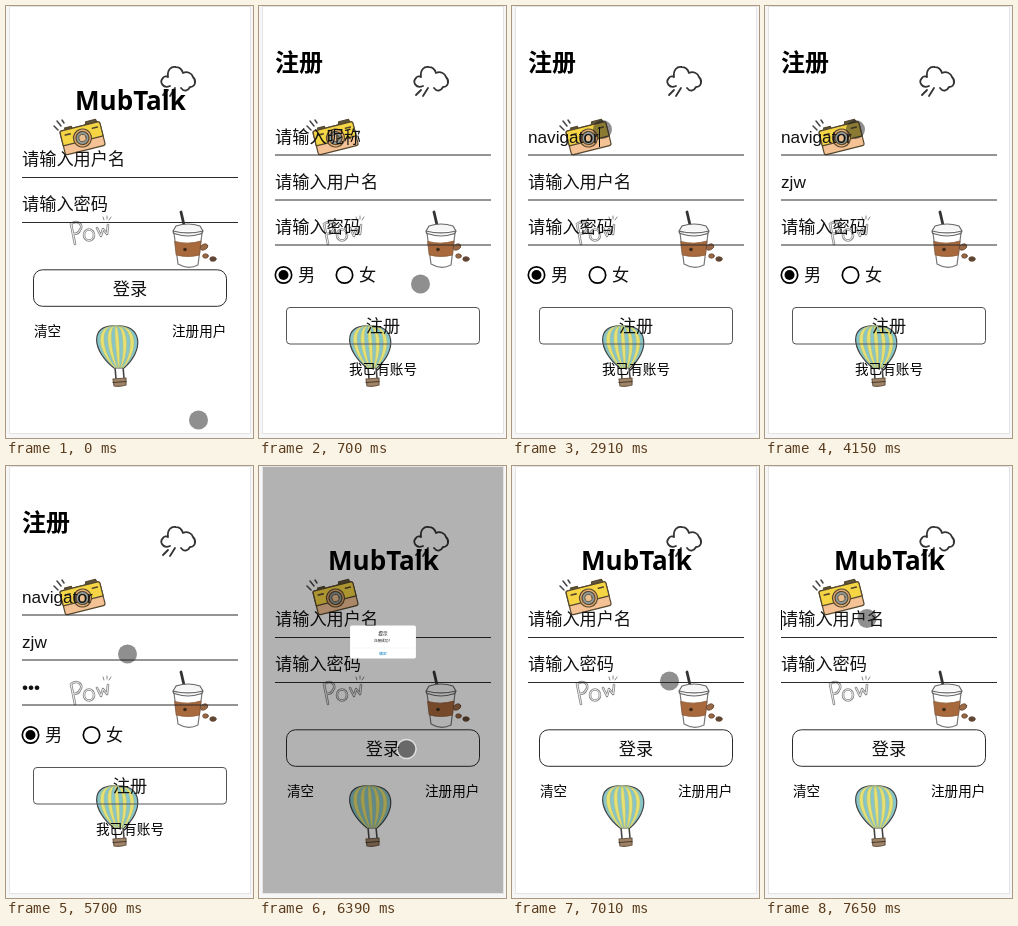
Write an HTML page that moves like this. It is 247 px wide and 432 px high and loops after 8 s.

```html
<!DOCTYPE html>
<html lang="zh-CN">
<head>
<meta charset="utf-8">
<style>
html, body { margin: 0; width: 100%; height: 100%; overflow: hidden; background: #f6f6f6; }
svg { display: block; width: 247px; height: 432px; }
text { font: 17.2px "Liberation Sans", "Noto Sans CJK SC", "Noto Sans CJK", sans-serif; fill: #111; }
.mid { text-anchor: middle; }
.small { font-size: 13.6px; fill: #000; }
.logo { font: bold 26px "Open Sans", "Noto Sans", sans-serif; fill: #000; }
.title { font-size: 24px; font-weight: bold; fill: #000; }
.tip { font-size: 10.9px; }
.ok { font-size: 11px; font-weight: 500; fill: #0a7fc4; }
.rule { stroke: #2b2b2b; fill: none; }
.ink { stroke: #444; stroke-width: 1.2; stroke-linecap: round; stroke-linejoin: round; fill: none; }
</style>
</head>
<body>
<svg viewBox="0 0 247 432">
  <rect x="3.5" y=".5" width="241" height="427" fill="#fff" stroke="#e4e4e4"/>

  <g class="ink">
    <g stroke="#333" stroke-width="1.8">
      <path d="M164 80C157 83 153 76 157 72C158 70 161 70 162 71C161 64 165 60 170 61C174 61 176 64 177 67C181 65 186 67 187 71C191 75 189 81 184 81C182 85 178 86 175 82"/>
      <path d="M162 84L157 89M169 82L164 90"/>
    </g>
    <g>
      <path d="M48 120L52 124M51 115L55 120M56 114L58 117" stroke-width="1.5"/>
      <g transform="translate(76.5 132) rotate(-14)" stroke="#55482f">
        <path d="M-15-12v-2h7v2M6-12l1-3h10l1 3" fill="#5d543a"/>
        <rect x="-20.5" y="-12" width="41" height="24.500" rx="2" fill="#f4c294"/>
        <path d="M-20.5 3V-10q0-2 2-2h37q2 0 2 2V3Z" fill="#f6d545"/>
        <path d="M12-7h5M-16-7h5" stroke-width="1.600"/>
        <circle r="9" fill="#e8ad74"/>
        <circle r="6.500" fill="#8f9a9c"/>
        <circle r="3.600" fill="#e9bf92" stroke-width=".800"/>
      </g>
    </g>
    <g stroke="#888" stroke-width="2.6">
      <path id="pow" d="M65 218L69 238M65 218C72 213 78 219 74 224C73 227 70 228 67 228M88 229A5 5.500 0 1 1 78 229A5 5.500 0 1 1 88 229M91 222L95 230L97 223L101 228L102 219"/>
      <use href="#pow" stroke="#eee" stroke-width="1"/>
      <path d="M97 211L98 214M101 210V213M105 211L103 214" stroke-width="1"/>
    </g>
    <g>
      <path d="M175 206L178 219" stroke="#333" stroke-width="2.800"/>
      <path d="M168 227L172 258Q182 264 192 259L196 227Z" fill="#fff" stroke="#777"/>
      <path d="M169 235.500Q182 239 195 235L193.500 249Q182 252 170.500 249Z" fill="#a8693c" stroke="#8a5a36" stroke-width=".800"/>
      <circle cx="179" cy="243.500" r="1.800" fill="#3c2a1c" stroke="none"/>
      <path d="M167 225L170 220Q182 216 194 220L197 225Q196 228 194 228Q182 232 170 228Q167 228 167 225ZM167 225Q182 229 197 225" fill="#f6f6f6" stroke="#666"/>
      <g fill="#9a6a48" stroke="#6b4831" stroke-width=".800">
        <ellipse cx="198" cy="241" rx="4" ry="2.800" transform="rotate(-25 198 241)"/>
        <ellipse cx="199.500" cy="250" rx="2.800" ry="2.200"/>
        <ellipse cx="207" cy="253" rx="3.200" ry="2.300" fill="#5d4636"/>
      </g>
    </g>
    <g>
      <path d="M109 361L110 373M117 361L118 372" stroke-width="1.600"/>
      <path id="envelope" fill="#86c5ca"/>
      <path id="stripes" fill="#e8e070" stroke="#a9bb82" stroke-width=".500"/>
      <path d="M107 373L120 372L120 379Q114 381 108 380Z" fill="#a08468" stroke="#6d5a48"/>
      <path d="M107 376.500L120 375.500" stroke="#4a3a2c"/>
    </g>
  </g>

  <g id="login">
    <text class="logo mid" x="124.500" y="104">MubTalk</text>
    <text x="16" y="159">请输入用户名</text>
    <text x="16" y="204">请输入密码</text>
    <path class="rule" d="M16 171.500H232M16 216.500H232"/>
    <rect class="rule" x="27.500" y="263.800" width="193" height="36.500" rx="9"/>
    <text class="mid" x="124" y="289">登录</text>
    <text class="small" x="28" y="330">清空</text>
    <text class="small" x="166" y="330">注册用户</text>
  </g>

  <g id="signup">
    <text class="title" x="16" y="65">注册</text>
    <text class="field" x="16"></text>
    <text class="field" x="16"></text>
    <text class="field" x="16"></text>
    <path class="rule" d="M16 149H232M16 194H232M16 239H232"/>
    <g fill="none" stroke="#000" stroke-width="1.700">
      <circle cx="24.500" cy="269" r="8.200"/>
      <circle cx="85.500" cy="269" r="8.200"/>
    </g>
    <circle cx="24.500" cy="269" r="5"/>
    <text x="39" y="274.500">男</text>
    <text x="100" y="274.500">女</text>
    <rect class="rule" x="27.500" y="301.500" width="193" height="36.500" rx="3.500" style="stroke:#555"/>
    <text class="mid" x="124" y="326">注册</text>
    <text class="small mid" x="124" y="368">我已有账号</text>
  </g>

  <rect id="caret" width="1" height="20"/>

  <g id="modal">
    <rect x="4" y="1" width="240" height="426" opacity=".3"/>
    <g id="box">
      <rect x="28" y="128" width="192" height="96" rx="5" fill="#fff"/>
      <text class="small mid" x="124" y="157">提示</text>
      <text class="tip mid" x="124" y="175">注册成功！</text>
      <path d="M28 193.500H220" stroke="#e6e6e6"/>
      <text class="ok mid" x="124" y="213">确定</text>
    </g>
  </g>

  <g id="pointer">
    <circle r="9.500" fill="#202020" opacity=".5"/>
    <circle id="ring" r="9.500" fill="none" stroke="#fff" stroke-width="1.500" opacity=".7"/>
  </g>
</svg>
<script>
const LOOP = 8000, STEP = 76.9;
const $ = id => document.getElementById(id);
const show = (el, on) => el.setAttribute('display', on ? 'inline' : 'none');

// balloon gore between two meridians, each -1 (left edge) to 1 (right edge)
const gore = (u, v) => `M110 320C${110 + 27 * u} 318 ${112 + 26 * u} 345 ${113 + 5 * u} 362` +
  `L${113 + 5 * v} 362C${112 + 26 * v} 345 ${110 + 27 * v} 318 110 320Z`;
$('envelope').setAttribute('d', gore(-1, 1));
$('stripes').setAttribute('d', [1, 3, 5, 7, 9].map(i => gore(i * 2 / 11 - 1, (i + 1) * 2 / 11 - 1)).join(''));

const fields = [
  { y: 131, hint: '请输入昵称', text: 'navigator', keys: [1530, 1580, 2120, 2270, 2440, 2590, 2740, 2910, 2910] },
  { y: 176, hint: '请输入用户名', text: 'zjw', keys: [3520, 3670, 3750] },
  { y: 221, hint: '请输入密码', text: '•••', keys: [4780, 4930, 5010] }
];
document.querySelectorAll('.field').forEach((el, i) => fields[i].el = el);

// from, to, field index (-1: first login field)
const carets = [[1250, 2040, 0], [2120, 3140, 0], [3140, 3920, 1], [3920, 4150, 2],
  [4550, 5470, 2], [5860, 6240, 2], [7650, LOOP, -1]];

// pointer stops: step, x, y
const path = [[0, 192.5, 414], [7, 186, 327], [8, 186, 327], [12, 88, 131], [14, 88, 131],
  [16, 90.5, 123.5], [72, 90.5, 123.5], [74, 121.5, 188], [78, 138.5, 312], [80, 138.5, 312],
  [83, 147.5, 283], [85, 147.5, 283], [90, 157.5, 215], [91, 157.5, 215], [97, 102, 152.5], [105, 102, 152.5]];

const popScale = [.343, .78, .95, 1];

function pointerAt(n) {
  const i = path.findIndex(p => p[0] > n);
  const [a, ax, ay] = path[i - 1], [b, bx, by] = path[i];
  const k = (n - a) / (b - a);
  return [ax + (bx - ax) * k, ay + (by - ay) * k];
}

function draw(t) {
  const n = Math.floor((t + 9) / STEP);
  const signup = t >= 700 && t < 6240;
  show($('login'), !signup);
  show($('signup'), signup);

  for (const f of fields) {
    const count = f.keys.filter(k => k <= t).length;
    f.el.textContent = count ? f.text.slice(0, count) : f.hint;
    f.el.setAttribute('y', f.y + 6);
    f.typed = count;
  }

  const c = carets.find(([from, to]) => t >= from && t < to);
  show($('caret'), c);
  if (c) {
    const f = fields[c[2]];
    $('caret').setAttribute('x', 16 + (f && f.typed ? Math.round(f.el.getComputedTextLength()) : 0));
    $('caret').setAttribute('y', f ? f.y - 10 : 144);
  }

  const open = t >= 6390 && t < 7010;
  show($('modal'), open);
  if (open) {
    const s = popScale[Math.min(n - 83, 3)];
    $('box').setAttribute('transform', `translate(124 176) scale(${s}) translate(-124 -176)`);
  }

  $('pointer').setAttribute('transform', `translate(${pointerAt(n)})`);
  show($('ring'), t >= 6240 && t < 6550);
}

const start = performance.now();
function tick() {
  draw((performance.now() - start) % LOOP);
  requestAnimationFrame(tick);
}
tick();
</script>
</body>
</html>
```
